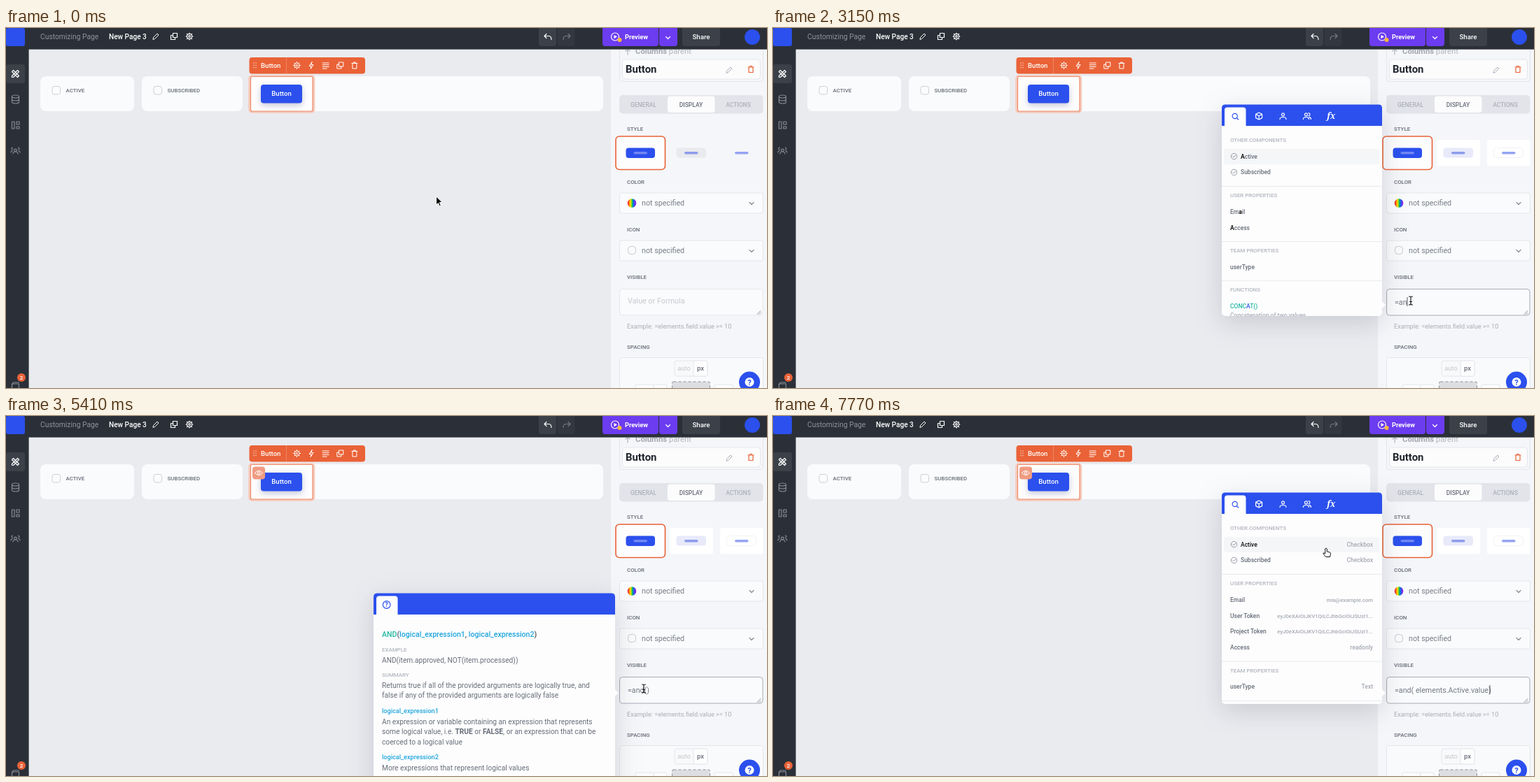
An HTML page that plays this animation: 1087 by 515 pixels, repeating every 8 s.

```html
<!DOCTYPE html>
<html lang="en">
<head>
<meta charset="utf-8">
<title>Page builder</title>
<style>
  html, body { margin: 0; width: 100%; height: 100%; overflow: hidden; background: #eaebef; }
  svg { display: block; width: 100vw; height: 100vh; font-family: Roboto, "Noto Sans", sans-serif; }
  text { white-space: pre; }
  .pop { filter: drop-shadow(0 10px 18px rgba(50, 58, 80, .18)); }
  .lift { filter: drop-shadow(0 3px 4px rgba(60, 70, 130, .3)); }
</style>
</head>
<body>
<svg viewBox="0 0 1087 515">
  <defs>
    <linearGradient id="hue">
      <stop offset=".08" stop-color="#f0283c"/><stop offset=".24" stop-color="#ffa000"/>
      <stop offset=".38" stop-color="#f0e600"/><stop offset=".52" stop-color="#14c850"/>
      <stop offset=".7" stop-color="#1464f0"/><stop offset=".9" stop-color="#8c28e6"/>
    </linearGradient>
    <clipPath id="listClip"><rect x="641" y="110" width="229" height="302" rx="5"/></clipPath>
    <clipPath id="panelClip"><rect x="864" y="31" width="223" height="484"/></clipPath>
  </defs>
  <g id="back"></g><g id="live"></g>
</svg>
<script>
const BLUE = '#2b50ed', ORANGE = '#ea6237', DARK = '#2b3038', RAISED = '#3b4049', GREY = '#676d78', PALE = '#b1b5bd',
  TEAL = '#20b7a0', SKY = '#1ea5dc', EDGE = '#e4e6eb', WHITE = '#fff';

const rect = (x, y, w, h, fill, r = 0, extra = '') =>
  `<rect x="${x}" y="${y}" width="${w}" height="${h}" rx="${r}" fill="${fill}" ${extra}/>`;
const circle = (x, y, r, fill, extra = '') => `<circle cx="${x}" cy="${y}" r="${r}" fill="${fill}" ${extra}/>`;
const text = (x, y, s, size, fill, weight = 400, anchor = 'start') =>
  `<text x="${x}" y="${y}" font-size="${size}" fill="${fill}" font-weight="${weight}" text-anchor="${anchor}">${s}</text>`;
const span = (s, fill, weight = 500) => `<tspan fill="${fill}" font-weight="${weight}">${s}</tspan>`;
const icon = (x, y, d, color, width = 1.2) =>
  `<path transform="translate(${x} ${y})" d="${d}" fill="none" stroke="${color}" stroke-width="${width}" stroke-linecap="round" stroke-linejoin="round"/>`;
const caption = (x, y, s, color = PALE) => text(x, y, s, 7.9, color, 500);
const border = (color, width = 1) => `stroke="${color}" stroke-width="${width}"`;

const ring = r => `M${-r} 0a${r} ${r} 0 1 0 ${2 * r} 0a${r} ${r} 0 1 0 ${-2 * r} 0`;
const D = {
  pencil: 'M-4 4l.6-2.6 5.4-5.4 2 2-5.4 5.4z',
  copy: 'M-1.5-4.5h6v6h-6zM-1.5-1.5h-3v6h6v-3',
  gear: ring(3.6) + ring(1.3) + 'M0-5v1M0 4v1M-5 0h1M4 0h1M-3.5-3.5l.7.7M3.5 3.5l-.7-.7M-3.5 3.5l.7-.7M3.5-3.5l-.7.7',
  undo: 'M-2-4l-3 3 3 3M-5-1h6q4 0 4 5',
  redo: 'M2-4l3 3-3 3M5-1h-6q-4 0-4 5',
  down: 'M-3-1.5l3 3 3-3',
  trash: 'M-4-3h8M-1.5-3v-1.5h3v1.5M-3-3v7.5h6v-7.5',
  bolt: 'M1-5l-4 6h3l-1 4 4-6h-3z',
  lines: 'M-4.5-3.5h9M-4.5-.8h9M-4.5 1.9h9M-4.5 4.6h6',
  tools: 'M-5-3l2-2 8 8-2 2zM5-3l-2-2-8 8v2h2z',
  data: 'M-5-4a5 2 0 1 0 10 0a5 2 0 1 0-10 0v8a5 2 0 0 0 10 0v-8M-5 0a5 2 0 0 0 10 0',
  layout: 'M-5-5h3.5v10h-3.5zM1.5-5h4v4h-4zM1.5 2h4v3h-4z',
  team: ring(1.8) + 'M-3.5 5q0-3 3.5-3t3.5 3M-4-4a1.4 1.4 0 1 0 0 3M4-4a1.4 1.4 0 1 1 0 3M-6.5 3q0-2 2-2.4M6.5 3q0-2-2-2.4',
  box: 'M-5-1h10v7h-10zM-5 1l2-4h8',
  search: ring(3.6) + 'M2.7 2.7l2.3 2.3',
  cube: 'M0-5l4.5 2.4v5.2l-4.5 2.4-4.5-2.4v-5.2zM-4.5-2.6l4.5 2.4 4.5-2.4M0-.2v5.2',
  person: 'M-2-2.2a2 2 0 1 0 4 0a2 2 0 1 0-4 0M-4.5 4.5q0-3 4.5-3t4.5 3',
  people: 'M-3.5-2.2a2 2 0 1 0 4 0a2 2 0 1 0-4 0M-5.5 4.5q0-3 4-3t4 3M2-4.3a2 2 0 0 1 0 4M3 1.4q2.5.6 2.5 3.1',
  check: ring(4.2) + 'M-1.8 0l1.4 1.5 3-3.4',
  eye: 'M-5.5 0q5.5-6.5 11 0q-5.5 6.5-11 0' + ring(1.7),
};

function background() {
  let s = rect(0, 0, 1087, 515, '#eaebef') + rect(0, 0, 32.6, 515, DARK) + settings() + rect(0, 0, 1087, 30.6, DARK);
  // top bar
  s += rect(0, 0, 27, 26, BLUE, 3) + text(49, 16, 'Customizing Page', 10.3, '#8e939c')
    + text(147, 16, 'New Page 3', 10.1, WHITE, 500) + icon(214, 12, D.pencil, WHITE, 1)
    + icon(240, 12, D.copy, WHITE) + icon(262, 12, D.gear, WHITE)
    + rect(966, -4, 54, 30, RAISED, 4) + text(993, 16, 'Share', 9.7, WHITE, 500, 'middle')
    + circle(1066, 13, 11, BLUE);
  // side bar
  s += rect(0, 52, 27, 27, RAISED, 3) + icon(13.5, 65.5, D.tools, WHITE);
  [['data', 102], ['layout', 139], ['team', 175], ['box', 510]].forEach(([k, y]) => s += icon(13.5, y, D[k], '#858b95'));
  s += circle(22, 500, 6, ORANGE) + text(22, 503, '2', 8, WHITE, 500, 'middle');
  // canvas cards
  [[49, 134], [194, 144], [349, 504]].forEach(([x, w]) => s += rect(x, 69, w, 50, '#fafbfc', 8));
  [[66, 'ACTIVE'], [211, 'SUBSCRIBED']].forEach(([x, name]) =>
    s += rect(x, 83.5, 11.5, 11.5, '#fcfcfd', 3, border('#ccd0d6')) + caption(x + 19.5, 92, name, GREY));
  s += rect(348, 69, 91.5, 51, 'none', 3, border('#f6cabb', 3.4)) + rect(349.5, 69.5, 88.5, 49.5, '#fdfdfe', 2, border('#ed8c6b', 1.2))
    + `<g class="lift">${rect(364, 81, 59, 26.5, BLUE, 4)}</g>`
    + text(393.5, 97, 'Button', 9.6, WHITE, 500, 'middle');
  // element toolbar
  s += rect(347.5, 42, 165.5, 23.5, ORANGE, 4);
  for (let i = 0; i < 6; i++) s += circle(354 + i % 2 * 3, 50 + (i >> 1) * 3.3, .8, '#f9c9b8');
  s += text(364, 57, 'Button', 9.6, WHITE, 500) + rect(400, 42, .8, 23.5, '#f08f70');
  ['gear', 'bolt', 'lines', 'copy', 'trash'].forEach((k, i) => s += icon(415.5 + i * 20.6, 53.5, D[k], WHITE, 1));
  return s;
}

const select = (y, mark) => rect(876.5, y, 205, 29, '#fafbfc', 3, border(EDGE)) + mark
  + text(908, y + 18, 'not specified', 10.7, '#777d88') + icon(1065, y + 15, D.down, '#858b95');

function settings() {
  let s = rect(864, 30, 223, 485, '#f5f6f9');
  s += icon(888, 33, 'M0 5v-8M-3 0l3-3 3 3', PALE)
    + text(899, 37, span('Columns', '#a3a8b0', 600) + ' parent', 11.3, PALE)
    + `<path d="M876.5 31v41q0 4.5 4.5 4.5h196q4.5 0 4.5-4.5V31" fill="none" stroke="${EDGE}"/>`
    + rect(880.5, 45, 197, 28, '#fcfcfd', 4, border(EDGE)) + text(885, 64, 'Button', 14.9, '#20252d', 600)
    + icon(1033, 60, D.pencil, '#a9aeb6', 1) + icon(1064, 59, D.trash, ORANGE);
  s += rect(876, 96, 205.5, 26.5, '#e2e4e9', 5) + rect(945, 97.5, 67.5, 23.5, '#fcfcfd', 4);
  [['GENERAL', 910.5], ['DISPLAY', 978.5], ['ACTIONS', 1046]].forEach(([name, x], i) =>
    s += text(x, 112.5, name, 8.5, i == 1 ? GREY : '#adb1b9', 500, 'middle'));
  [['STYLE', 147], ['COLOR', 223], ['ICON', 291], ['VISIBLE', 359], ['SPACING', 459]]
    .forEach(([name, y]) => s += caption(887, y, name, GREY));
  s += select(236, circle(894, 250.5, 6.3, 'url(#hue)'))
    + select(304, rect(888.5, 312.5, 11, 11, 'none', 4, border('#c6cad1')));
  s += text(887, 430, 'Example: =elements.field.value &gt;= 10', 9.1, '#a9adb5')
    + rect(876.5, 471.5, 205, 60, '#f9fafb', 3, border(EDGE))
    + rect(955, 476, 47, 22, '#f8f9fa', 3, border(EDGE)) + rect(982, 476, 20, 22, '#fdfdfe', 2, border(EDGE))
    + text(968.5, 490, 'auto', 9.4, '#c3c7cd', 400, 'middle') + text(992, 490, 'px', 9.4, GREY, 500, 'middle')
    + rect(951.5, 506, 54, 20, '#dcdee2', 2, border('#8d929b') + ' stroke-dasharray="4 3"');
  [899, 925, 1012].forEach(x => s += rect(x, 510, x == 925 ? 19 : 26, 20, '#fcfcfd', 2, border(EDGE)));
  return `<g clip-path="url(#panelClip)">${s}</g>`;
}

function styleCards(active) {
  let s = rect(871, 155, 70.5, 47.5, '#fdfdfe', 5, border(ORANGE, 1.6)) + rect(885.5, 171.5, 41.5, 14.5, BLUE, 4);
  if (active) s += rect(948, 160, 62, 37.5, WHITE, 3) + rect(1020, 160, 61.5, 37.5, WHITE, 3)
    + rect(1029.5, 171.5, 42, 14, WHITE, 4, border('#f1f2f6'));
  s += rect(957.5, 171.5, 42.5, 14, active ? '#e8eafa' : '#e9eaee', 4);
  [[896.5, '#7187f4'], [969, '#8d9cec'], [1041, '#95a4f2']].forEach(([x, c]) => s += rect(x, 177, 19.5, 3.6, c, 1.8));
  return s;
}

function header(saving, t) {
  const left = saving ? 858 : 852, shift = saving ? 5 : 0;
  let s = rect(761 + shift, -4, 25, 30, RAISED, 4) + rect(787.5 + shift, -4, 25, 30, '#333840', 4)
    + icon(774 + shift, 12.5, D.undo, WHITE) + icon(801 + shift, 12.5, D.redo, '#737983')
    + rect(left, -4, 932 - left, 30, '#6c3cf0', 4) + rect(933, -4, 26, 30, '#6c3cf0', 4)
    + icon(945.5, 14, D.down, WHITE);
  return s + (saving
    ? `<g transform="translate(876 11.5) rotate(${t * .4 % 360 | 0})">${circle(0, 0, 5.5, 'none', border('#b9a2fa') + ' stroke-dasharray="26 9"')}</g>`
      + text(889, 15.5, 'Saving', 9.4, WHITE, 500)
    : icon(870, 12.5, ring(5.5), WHITE) + `<path d="M868.5 10v5.2l4.5-2.6z" fill="${WHITE}"/>` + circle(876.5, 17, 3, '#f5b93a')
      + text(884, 15.5, 'Preview', 9.2, WHITE, 600));
}

const typed = [[0, '', 888], [2440, '=', 893.5], [2970, '=a', 899.5], [3150, '=an', 905.5], [3480, '=and', 911.5],
  [4760, '=and()', 919.5], [5650, '=and()', 915.5], [6160, '=and( )', 919],
  [7710, '=and( elements.Active.value)', 1023.5]];
const caretOff = [[0, 1420], [1930, 2440], [4000, 4470], [5410, 5650], [6660, 7180]];
const within = (t, spans) => spans.some(([a, b]) => t >= a && t < b);
const latest = (t, steps) => steps.filter(step => step[0] <= t).pop();

function field(t) {
  const [, value, caret] = latest(t, typed);
  return rect(876.5, 373.5, 204.5, 37.5, '#fafbfc', 4, border(t < 1420 ? EDGE : '#a6abb5'))
    + icon(1076, 407, 'M-3 2.5l5-5M0 2.5l2-2', '#868c96', 1)
    + (value ? text(888, 395.5, value, 10.7, '#737984') : text(888, 394, 'Value or Formula', 10.8, '#c6c9cf'))
    + (within(t, caretOff) ? '' : rect(caret, 385, .9, 13, '#3a3f48'));
}

// Popup frame: white body with pointer, blue header and its tab icons
function popup(x, y, h, tabs, body) {
  const w = 870 - x;
  const tops = tabs.map((k, i) => {
    const cx = x + 18.7 + i * 34.4, color = i ? WHITE : BLUE;
    return k == 'fx' ? `<text x="${cx}" y="${y + 20.5}" font-family="Noto Serif, serif" font-style="italic" font-weight="700" font-size="12" fill="${WHITE}" text-anchor="middle">fx</text>`
      : k == 'help' ? circle(cx, y + 16.5, 5.3, 'none', border(BLUE, 1.2)) + text(cx, y + 19.7, '?', 8.5, BLUE, 700, 'middle')
      : icon(cx, y + 16.5, D[k], color);
  }).join('');
  return `<g class="pop">${rect(x, y, w, h, '#fdfdfe', 5)}<path d="M869 390.5l6 5.5-6 5.5z" fill="#fdfdfe"/></g>`
    + `<path d="M${x} ${y + 30.5}v-25.5q0-5 5-5h${w - 10}q5 0 5 5v25.5z" fill="${BLUE}"/>`
    + `<path d="M${x + 4} ${y + 31}v-23q0-4 4-4h22.5q4 0 4 4v23z" fill="#fdfdfe"/>` + tops + body;
}

function list(sections, hover) {
  let y = 160, s = rect(644, 173, 222.5, 22, '#f5f6f8', 3);
  for (const [title, ...rows] of sections) {
    s += caption(653, y + 2.8, title);
    y += 23.6;
    for (const [name, note = '', checkbox] of rows) {
      const idle = name == 'Nothing here', hot = !idle && Math.abs(hover - y) < 11.4;
      if (checkbox) s += icon(658.5, y, D.check, '#8b919b', .9);
      s += text(checkbox ? 668 : 653, y + 3, name, 8.5, hot ? '#111' : idle ? '#9ba0a9' : GREY, 500)
        + text(857, y + 3, note, note.length > 12 ? 7.7 : 8.5, '#a4a9b1', 500, 'end');
      y += 22.8;
    }
    y += 9.9;
    s += rect(641, y - 13.2, 229, .9, '#e6e8ec');
  }
  return popup(641, 109.5, 302.5, ['search', 'cube', 'person', 'people', 'fx'], `<g clip-path="url(#listClip)">${s}</g>`);
}

const token = 'eyJ0eXAiOiJKV1QiLCJhbGciOiJSUzI1...', hit = s => span(s, '#111', 700);
const boxes = note => ['OTHER COMPONENTS', ['Active', note, 1], ['Subscribed', note, 1]];
const email = ['Email', 'mia@example.com'], empty = ['Nothing here'];
const fullList = hover => list([boxes('Checkbox'), ['PAGE INPUTS', empty], ['PAGE QUERIES', empty],
  ['USER PROPERTIES', email, ['User Token', token]]], hover);
const valueList = hover => list([boxes('Checkbox'),
  ['USER PROPERTIES', email, ['User Token', token], ['Project Token', token], ['Access', 'readonly']],
  ['TEAM PROPERTIES', ['userType', 'Text']]], hover);
const matchList = () => list([
  ['OTHER COMPONENTS', [hit('A') + 'ctive', '', 1], ['Subscribed', '', 1]],
  ['USER PROPERTIES', [`Em${hit('a')}il`], [hit('A') + 'ccess']], ['TEAM PROPERTIES', ['userType']],
  ['FUNCTIONS', [span('CONC', TEAL) + span('A', BLUE) + span('T()', TEAL)]]])
  + `<g clip-path="url(#listClip)">${text(653, 414, 'Concatenation of two values', 8.5, '#a9adb5', 500)}</g>`;
const andList = () => popup(641, 335.5, 113.5, ['search', 'fx'], caption(653, 388.7, 'FUNCTIONS')
  + rect(644, 399, 222.5, 34, '#f5f6f8', 3) + text(653, 412.5, span('AND', BLUE, 600) + span('()', TEAL), 8.5, BLUE)
  + text(653, 425, 'Logical AND operator', 8.5, '#a4a9b1', 500));

function docs() {
  const arg = n => span('logical_expression' + n, SKY), line = (y, s) => text(537, y, s, 10.2, GREY);
  return popup(525, 253.5, 300, ['help'],
    text(537, 316, `${span('AND', TEAL)}(${arg(1)}, ${arg(2)})`, 10.55, '#4b515c', 500)
    + caption(537, 336.5, 'EXAMPLE') + line(352.5, 'AND(item.approved, NOT(item.processed))')
    + caption(537, 372.5, 'SUMMARY') + line(388.5, 'Returns true if all of the provided arguments are logically true, and')
    + line(403, 'false if any of the provided arguments are logically false')
    + text(537, 424.5, arg(1), 9.1, SKY) + line(440.5, 'An expression or variable containing an expression that represents')
    + line(455, `some logical value, i.e. ${span('TRUE', GREY, 700)} or ${span('FALSE', GREY, 700)}, or an expression that can be`)
    + line(469.5, 'coerced to a logical value') + text(537, 490.5, arg(2), 9.1, SKY)
    + line(507, 'More expressions that represent logical values'));
}

const popups = [[0, () => ''], [1420, fullList], [3120, matchList], [3360, andList], [4760, docs],
  [5700, fullList], [6160, docs], [6310, fullList], [7740, valueList]];

const glide = (t, a, b) => { const p = Math.min(1, Math.max(0, (t - a) / (b - a))); return p * p * (3 - 2 * p); };
function pointer(t) {
  const enter = glide(t, 570, 1120), leave = glide(t, 6490, 7290), settle = glide(t, 7320, 7470);
  const x = 614.5 + 296.5 * enter - 121 * leave, y = 241 + 149 * enter - 196 * leave - 5 * settle;
  return { x, y, kind: x > 876 && y > 373 ? 'beam' : leave && x < 870 ? 'hand' : 'arrow' };
}
const cursors = {
  arrow: '<path d="M0 0v12l2.8-2.6 1.9 4.4 2-.9-1.9-4.3h3.9z" fill="#000" stroke="#fff"/>',
  beam: icon(0, 0, 'M-2.5-6q2.5 0 2.5 1.5v9q0 1.5-2.5 1.5M2.5-6q-2.5 0-2.5 1.5M0 4.5q0 1.5 2.5 1.5M-1.5 1.5h3', '#111', 1.1),
  hand: '<path d="M-1.3 1q1.3-2.2 2.6 0v4l3.6.8q1.7.5 1.5 2.4l-.8 4.3h-6l-3.6-4.3q-.6-1.4 1-1.3l1.7 1.2z" fill="#fff" stroke="#111"/>',
};

function scene(t) {
  const { x, y, kind } = pointer(t), saving = within(t, [[3700, 4470], [4880, 5230]]);
  const hidden = within(t, [[3500, 4100], [5200, 8000]]);
  return header(saving, t) + styleCards(t >= 1420) + field(t)
    + (hidden ? rect(352, 72.5, 18, 18, '#ef9b82', 4) + icon(361, 81.5, D.eye, WHITE, 1) : '')
    + circle(1062, 506.5, 15, BLUE) + circle(1062, 506.5, 6.5, WHITE) + text(1062, 510.5, '?', 11, BLUE, 700, 'middle')
    + latest(t, popups)[1](kind == 'hand' ? y : -99)
    + `<g transform="translate(${x.toFixed(1)} ${y.toFixed(1)})">${cursors[kind]}</g>`;
}

const back = document.getElementById('back'), live = document.getElementById('live');
back.innerHTML = background();
let shown = '';
function frame() {
  const next = scene(performance.now() % 8000);
  if (next !== shown) live.innerHTML = shown = next;
  requestAnimationFrame(frame);
}
frame();
</script>
</body>
</html>
```
